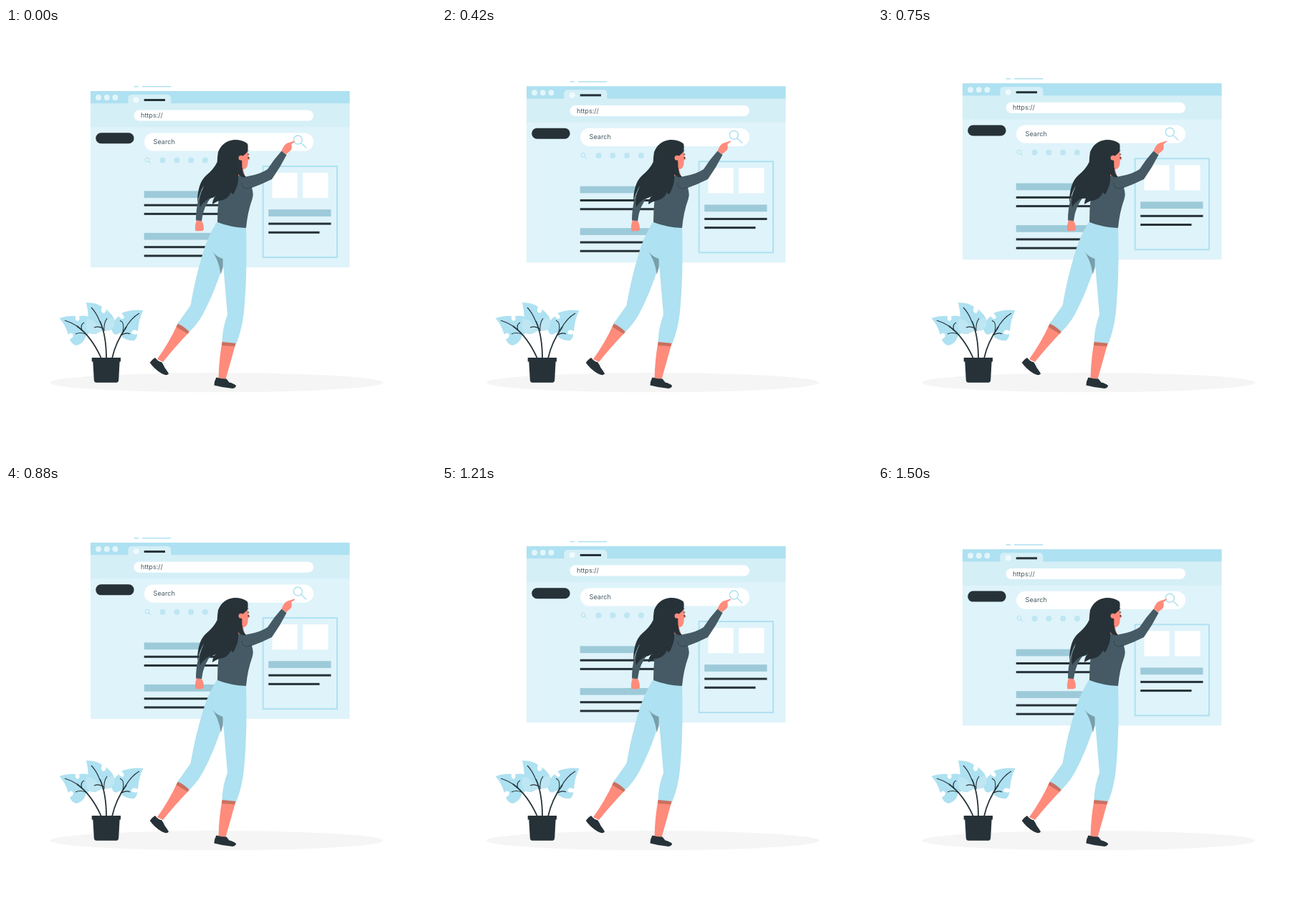
An HTML page with a canvas for the animation above (1540 ms loop, 600 by 600 pixels).

```html
<!DOCTYPE html>
<html lang="en">
<head>
<meta charset="utf-8">
<title>Search page</title>
<style>
html, body { margin: 0; width: 100%; height: 100%; overflow: hidden; background: #fff; }
canvas { display: block; width: 600px; height: 600px; }
</style>
</head>
<body>
<canvas id="stage" width="600" height="600"></canvas>
<script>
const ctx = document.getElementById('stage').getContext('2d');
const LOOP = 1540, FPS = 24;
const DARK = '#263238', SKY = '#aee1f1', PALE = '#d5eff7', PAGE = '#dff3fa',
      DOT = '#bee6f3', BAR = '#9dcad9', SKIN = '#ff8b7b', CUFF = '#c9705f',
      SHIRT = '#455a64', WHITE = '#fff';

const fill = (color, d) => {
  ctx.fillStyle = color;
  ctx.fill(new Path2D(d));
};
const stroke = (color, width, d) => {
  ctx.strokeStyle = color;
  ctx.lineWidth = width;
  ctx.stroke(new Path2D(d));
};
const rect = (color, x, y, w, h) => {
  ctx.fillStyle = color;
  ctx.fillRect(x, y, w, h);
};
const round = (color, x, y, w, h, r) => {
  ctx.fillStyle = color;
  ctx.beginPath();
  ctx.roundRect(x, y, w, h, r);
  ctx.fill();
};
const dot = (color, x, y, r) => {
  ctx.fillStyle = color;
  ctx.beginPath();
  ctx.arc(x, y, r, 0, 7);
  ctx.fill();
};
const lens = (x, y, r, reach, width) => {
  ctx.beginPath();
  ctx.arc(x, y, r, 0, 7);
  ctx.moveTo(x + r * 0.71, y + r * 0.71);
  ctx.lineTo(x + reach, y + reach * 0.96);
  ctx.strokeStyle = SKY;
  ctx.lineWidth = width;
  ctx.stroke();
};
const label = (text, x, y) => {
  ctx.fillStyle = SHIRT;
  ctx.font = '9.1px Inter, sans-serif';
  ctx.fillText(text, x, y);
};

function paragraph(y) {
  rect(BAR, 192.7, y, 110, 9.7);
  rect(DARK, 192.7, y + 18.3, 110, 3);
  rect(DARK, 192.7, y + 30.5, 110, 3);
}

function browser() {
  rect(SKY, 178.5, 80.9, 6.5, 1.5);
  rect(SKY, 190, 80.9, 40.3, 1.5);

  rect(PAGE, 118, 88, 361.5, 246);
  rect(PALE, 118, 105, 361.5, 33.3);
  rect(SKY, 118, 88, 361.5, 17.2);
  for (const x of [129, 140.8, 152.4]) dot('#e3f5fa', x, 97, 4);
  round(PALE, 170.3, 93, 60, 13, [5, 5, 0, 0]);
  dot('#eefafd', 181.7, 100.3, 4);
  rect(DARK, 192.7, 99, 29.3, 3);

  round(WHITE, 178.5, 114.6, 250.5, 15, 7.5);
  label('https://', 188, 125.2);
  round(DARK, 125.2, 146.3, 53.4, 15, 7.5);
  round(WHITE, 193, 146.4, 236, 25.2, 12.6);
  label('Search', 205.6, 161.8);
  lens(407.3, 156, 6, 11.8, 1.5);
  lens(197, 184, 2.9, 5.2, 1);
  for (let i = 0; i < 4; i++) dot(DOT, 218.5 + i * 19.8, 184.6, 4);

  paragraph(227.4);
  paragraph(285.9);

  ctx.strokeStyle = SKY;
  ctx.lineWidth = 2;
  ctx.strokeRect(358.7, 193, 103.3, 127);
  rect(WHITE, 371.5, 202, 35.2, 35.2);
  rect(WHITE, 414.2, 202, 35.2, 35.2);
  rect(BAR, 366.2, 253.2, 87.3, 9.7);
  rect(DARK, 366.2, 271.6, 87.3, 3);
  rect(DARK, 366.2, 283.8, 71.3, 3);
}

function plant() {
  fill(SKY, 'M74.5 405Q87 401 97 402Q96 408 100 409Q104 407 102 402Q113 400 120 405Q126 414 118 425Q111 428 110 434Q105 442 98 443Q91 441 89 434Q94 433 94 428Q91 423 87 428Q83 414 74.5 405Z');
  fill(SKY, 'M191.5 394Q175 392 161 398Q167 403 163 406Q158 405 158 402Q149 407 147 420Q150 430 156 427Q162 422 162 431Q169 437 179 436Q184 431 183 427Q175 429 175 424Q178 419 184 423Q185 407 191.5 394Z');
  fill(SKY, 'M112 383Q126 383 134 389Q131 396 136 398Q141 396 139 392Q150 400 152 410Q151 421 141 422Q132 422 125 427Q114 428 113 419Q117 405 112 383Z');
  fill(DOT, 'M113 406Q123 406 128 415L137 416Q140 406 149 404Q155 414 147 421Q140 424 134 421Q127 429 117 426Q109 421 113 406Z');
  stroke(DARK, 1.8, 'M133 461Q119 430 99 416');
  stroke(DARK, 1.8, 'M140 461Q140 429 131 409');
  stroke(DARK, 1.8, 'M148 461Q153 438 168 417');
  stroke(DARK, 1.1, 'M101 417Q92 411 82 408M106 422Q103 414 109 411M111 427Q103 424 97 427M131 410Q126 397 119 390M136 420Q130 415 123 418M137 423Q136 412 141 405M166 420Q174 405 186 398M163 424Q166 411 159 408M160 429Q168 424 173 427');
  fill(DARK, 'M119.7 460H160V465.6H158.6L157.2 491Q157 494.7 154 494.7H126Q123 494.7 122.8 491L121.3 465.6H119.7Z');
}

function legs() {
  fill(SKIN, 'M239 414L256 424Q234 447 219 466L211 462Q227 440 239 414Z');
  fill(SKIN, 'M301.5 438L320.5 440Q314 464 306.5 490L296.5 489Q297 464 301.5 438Z');
  fill(CUFF, 'M241 410L257 421L253.5 426.8L237.5 417Z');
  fill(CUFF, 'M302 437L321 439L319.3 444.3L301 443Z');
  fill(DARK, 'M208 460Q203 463 200.7 467Q207 476 217 482Q224 486 227 482.5Q226 480 221.5 474Q220 470 217 466Q213 466 208 460Z');
  fill(DARK, 'M293.5 487.5Q290.8 492 290.4 498.5Q303 502 316 503Q321 502 321 499Q318 496 311.5 494.5L307.5 489.5Q301 490 293.5 487.5Z');
  stroke('#e5edf0', 1, 'M219.5 467L223.5 472M308.5 489.5L313 493');
  fill(SKY, 'M294 271Q281 292 274.5 315Q264 349 257.5 387L239.5 412.5Q248 416 256 424Q268 412 275 399Q291 369 303 330L309 400Q302 418 301.5 438L321.5 440Q329 421 331.5 400Q337 349 335 278Z');
  fill('#789eaa', 'M286 309Q291 318 302.5 322L302.7 334L299.7 344Q297 323 286 309Z');
}

function body() {
  fill(SHIRT, 'M279 217Q265 237 265 268.5L273 269.5Q275 248 289 233Z');
  fill(SKIN, 'M265.8 268.5L273 269Q276 274 276 281Q275 283.4 271 283.2H264.3Q263 277 265.8 268.5Z');
  fill(SKIN, 'M327 178L336 170Q338 172 338.3 178L340.5 183L337.7 184.5Q338 193 334 196.5L331 197L334 209L321 211Z');
  fill(SHIRT, 'M317 203Q330 209 337 207Q355 204 365 197Q374 183 384.5 171.5L391.5 177Q383 194 371 211Q357 218 343 223Q346 232 343.5 239Q337 257 335 279Q313 278 295 271Q295 252 297 235Z');
  fill(SKIN, 'M384.5 171.5Q388 162 393 160.5L402.5 157.5Q404 158.7 402 159.6L398.3 162Q399.5 168 397.5 170.5L391 176Z');
  stroke('#2f4049', 0.7, 'M329 216Q329 224 336 224L343 222.7');
}

function head() {
  fill(DARK, 'M336.5 161Q329 155.5 318 156Q302 158 296 173Q295 179 294.7 187Q290 197 279 206Q267 217 267 244Q270 230 276 220Q268 239 271 250Q275 243 283 238Q290 237 293 234Q288 239 288 246Q292 243 296 241.5Q310 240 314 229Q316 237 321 224Q325 215 324 204Q327 209 335 208Q330 203 330 196L330 183L331 179Q337 176 337.5 169Q338 163 336.5 161Z');
  dot(SKIN, 328, 181.2, 3.5);
  fill(SKIN, 'M329 180L337 173L337 186L332 195L329.5 195Z');
  stroke(DARK, 1.1, 'M336.2 171.5L338.3 171M337.2 176.5L339.3 176');
  dot(DARK, 338.3, 181.3, 1.1);
}

// Vertical float of the browser window, in pixels, at the given time in seconds.
const floatAt = t => Math.max(-16 * t, 0.3 - 14.8 * (1.5 - t));

function draw(now) {
  const ms = now % LOOP;
  // Each step starts on a multiple of 10 ms, as close to 24 per second as that allows.
  const step = Math.floor((ms + 5) * FPS / 1000) % 37;
  rect(WHITE, 0, 0, 600, 600);
  ctx.fillStyle = '#f5f5f5';
  ctx.beginPath();
  ctx.ellipse(294, 494.7, 232.3, 13.6, 0, 0, 7);
  ctx.fill();

  ctx.save();
  ctx.translate(0, floatAt(step / FPS));
  browser();
  ctx.restore();

  plant();
  legs();
  body();
  head();
}

const start = performance.now();
function tick() {
  draw(performance.now() - start);
  requestAnimationFrame(tick);
}
tick();
</script>
</body>
</html>
```
